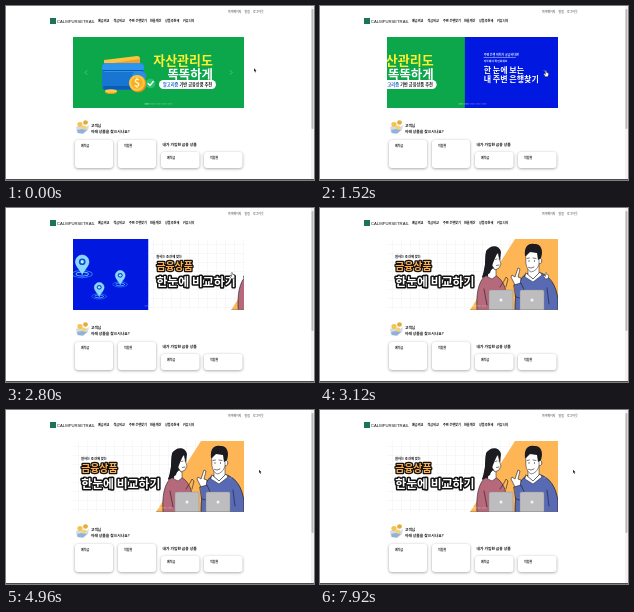
Write an HTML page with a canvas that moves like this. It is 308x174 px and loops after 8 s.

```html
<!DOCTYPE html>
<html lang="ko">
<head>
<meta charset="utf-8">
<style>
html, body { margin: 0; width: 100%; height: 100%; overflow: hidden; background: #fff; }
canvas { display: block; width: 308px; height: 174px; }
</style>
</head>
<body>
<canvas id="stage"></canvas>
<script>
const W = 308, H = 174, LOOP = 8000;
const FONT = '"Noto Sans CJK KR", "Noto Sans CJK", "Noto Sans", sans-serif';
const BANNER = { x: 67, y: 31, w: 171, h: 71 };
const SLIDE_MS = 600, CLICKS = [1205, 2480];
const INK = '#1b1b20';
const canvas = document.getElementById('stage');
const c = canvas.getContext('2d');
const dpr = window.devicePixelRatio || 1;
canvas.width = W * dpr;
canvas.height = H * dpr;

function paint(fill, stroke, width = 1) {
  if (fill) { c.fillStyle = fill; c.fill(); }
  if (stroke) { c.strokeStyle = stroke; c.lineWidth = width; c.stroke(); }
}
function rect(x, y, w, h, fill) { c.fillStyle = fill; c.fillRect(x, y, w, h); }
function box(x, y, w, h, r, fill, stroke, width) {
  c.beginPath(); c.roundRect(x, y, w, h, r); paint(fill, stroke, width);
}
function oval(x, y, rx, ry, fill, stroke, width) {
  c.beginPath(); c.ellipse(x, y, rx, ry, 0, 0, Math.PI * 2); paint(fill, stroke, width);
}
function shape(d, fill, stroke, width) {
  const p = new Path2D(d);
  if (fill) { c.fillStyle = fill; c.fill(p); }
  if (stroke) { c.strokeStyle = stroke; c.lineWidth = width || 1; c.stroke(p); }
}
function text(s, x, y, size, fill, { weight = 700, align = 'left', outline = 0 } = {}) {
  c.font = `${weight} ${size}px ${FONT}`;
  c.textAlign = align;
  if (outline) {
    c.strokeStyle = '#111';
    c.lineWidth = outline;
    c.strokeText(s, x, y);
  }
  c.fillStyle = fill;
  c.fillText(s, x, y);
}

// Cubic Bezier (.42, 0, .58, 1), the CSS "ease-in-out" curve
function easeInOut(p) {
  if (p <= 0) return 0;
  if (p >= 1) return 1;
  const at = (u, a, b) => 3 * a * u * (1 - u) ** 2 + 3 * b * u * u * (1 - u) + u ** 3;
  let lo = 0, hi = 1;
  for (let i = 0; i < 24; i++) {
    const mid = (lo + hi) / 2;
    if (at(mid, .42, .58) < p) lo = mid; else hi = mid;
  }
  return at(lo, 0, 1);
}
const step = (t, start, length) => easeInOut((t - start) / length);

function walletSlide() {
  rect(0, 0, 172, 71, '#0ca64b');
  shape('M31 23L64 19Q67 19 67 22V30H31Z', '#ffc43b');
  shape('M33 27L67 22V32H33Z', '#f1a12a');
  box(29, 26, 42, 27, 4, '#1676d2');
  box(29, 26, 42, 9, 4, '#2c95ec');
  rect(30, 33, 40, 1, '#0d57ab');
  box(30, 49, 40, 3.5, 2, '#0c5cb5');
  box(59, 35, 14, 9, 4, '#2b8ee5');
  oval(65, 47, 8.5, 8.5, '#dc901b');
  oval(64, 46, 8, 8, '#ffc73e');
  oval(64, 46, 5.8, 5.8, '#f7ae26');
  text('$', 64, 50, 11, '#fff3b9', { align: 'center' });
  oval(77.5, 46.5, 4.8, 4.8, '#27c36b');
  shape('M75 46.5L77 48.5L80.2 44.5', null, '#fff', 1.3);
  oval(38, 55, 6, 2, '#e79b20');
  oval(38, 54, 6, 1.8, '#ffcd4b');
  text('자산관리도', 140, 28.3, 13, '#fff22e', { weight: 900, align: 'right' });
  text('똑똑하게', 140, 41.7, 12.4, '#fff', { weight: 900, align: 'right' });
  box(86, 43, 57, 9, 4.5, '#fff');
  text('알고리즘', 90, 49.3, 4.2, '#1465c8');
  text('기반 금융상품 추천', 106.5, 49.3, 4.2, '#171717');
}

function pin(x, y, s) {
  c.save();
  c.translate(x, y);
  c.scale(s, s);
  oval(0, 9, 9, 3.2, null, '#2b75f4', .9);
  oval(0, 9, 5.5, 1.8, null, '#69c1ff', .9);
  shape('M0 9C-2 5-6 2-6-2A6 6 0 1 1 6-2C6 2 2 5 0 9Z', '#87d8fa', '#b5efff', .5);
  oval(0, -2, 3, 3, '#164bd8');
  oval(0, -2, 1.5, 1.5, '#b9edff');
  c.restore();
}

function bankSlide() {
  rect(0, 0, 172, 71, '#0018df');
  text('주변 은행 위치가 궁금하다면', 19, 18.8, 3, '#dfe7ff');
  rect(19, 20.5, 32, .5, '#dfe7ff');
  text('지도에서 확인하세요', 19, 24.6, 2.8, '#dfe7ff');
  text('한 눈에 보는', 19, 35.5, 8, '#fff', { weight: 900 });
  text('내 주변 은행찾기', 19, 44.8, 8, '#fff', { weight: 900 });
  pin(105, 25, 1.12);
  pin(143, 38, .82);
  pin(122, 50, .82);
}

function laptop(x) {
  box(x, 51, 24, 22, 1.5, '#bdbdc0', '#8b8b90', .4);
  oval(x + 12, 61, 1.5, 1.5, '#f4f4f6');
}

function woman() {
  shape('M95 38C100 31 97 20 99 13C102 6 112 5 114 13L113 22L109 31L107 39Z', INK);
  shape('M90 71C89 56 91 43 98 37L108 36C115 40 118 47 119 53V71Z', '#b5697a', INK, .6);
  shape('M101 34L106 29L109 31V37L105 40L101 38Z', '#fff', INK, .5);
  shape('M105 16L111 14L113 22L114 25L112 29L108 31L104 25Z', '#fff', INK, .5);
  shape('M99 12Q106 5 112 11L109 17L106 24L103 34L95 39Q99 25 99 12Z', INK);
  shape('M108.5 20.5L110 20M112 20L113 19.8M109.5 26.5L112 26', null, INK, .6);
  shape('M97 50L100 66M113 48L117 42L119 38L121 40L119 48', null, INK, .6);
}

function man() {
  shape('M128 71C128 53 131 40 139 35L151 33C163 36 169 46 171 60V71Z', '#596ab5', INK, .7);
  shape('M141 28V36L146 40L152 34V25Z', '#fff', INK, .5);
  shape('M139 34L146 40L153 33L155 36L146 43L138 38Z', '#fff', INK, .5);
  oval(153, 22, 1.8, 2.7, '#fff', INK, .5);
  shape('M139 14Q147 10 152 15V25Q150 32 144 33Q140 31 139 25Z', '#fff', INK, .5);
  shape('M138 17C137 8 141 4 147 5C153 4 157 10 154 19L151 21L150 14L143 13L139 17Z', INK);
  shape('M140 19.5L142.5 19M146 19L149 19.5M141.5 28.5Q144 30 147 28', null, INK, .6);
  oval(142, 22, .5, .7, INK);
  oval(147.5, 22, .5, .7, INK);
  shape('M128 46L124 38L125 36L128 38L131 29L133 30L131 38L134 39L133 46Z', '#fff', INK, .6);
  shape('M127 46L134 44L138 53L136 60L129 58Z', '#596ab5', INK, .6);
  shape('M160 49L162 65', null, INK, .6);
}

function compareSlide() {
  rect(0, 0, 172, 71, '#fff');
  for (let x = 5; x < 125; x += 9) rect(x, 0, .4, 71, '#ececee');
  for (let y = 5; y < 71; y += 9) rect(0, y, 125, .4, '#ececee');
  shape('M128 0H172V71H83Z', '#fdb556');
  woman();
  man();
  laptop(102);
  laptop(133);
  rect(83, 70.6, 89, .4, '#77716a');
  text('원하는 조건에 맞는', 8, 19.2, 3.3, '#111', { weight: 900 });
  text('금융상품', 8.2, 31.2, 9.9, '#ffae49', { weight: 900, outline: 2.5 });
  text('한눈에 비교하기', 8.2, 46.5, 11.9, '#fff', { weight: 900, outline: 3 });
}

function controls(shift, hover) {
  const white = a => `rgba(255,255,255,${a})`;
  shape('M81 64.6L79.1 66.5L81 68.4', null, white(.5), .6);
  shape('M224.2 64.6L226.1 66.5L224.2 68.4', null, white(.5 + .4 * hover), .6);
  for (let i = 0; i < 5; i++) {
    const active = Math.max(0, 1 - Math.abs(i - shift));
    rect(138.5 + i * 5.8, 97.7, 4.8, .5, white(.5 + .5 * active));
  }
}

function carousel(t) {
  const { x, y, w, h } = BANNER;
  const shift = CLICKS.reduce((sum, start) => sum + step(t, start, SLIDE_MS), 0);
  c.save();
  c.beginPath();
  c.rect(x, y, w, h);
  c.clip();
  [walletSlide, bankSlide, compareSlide].forEach((draw, i) => {
    const pos = i - shift;
    if (Math.abs(pos) >= 1) return;
    c.save();
    c.translate(x + pos * w, y);
    c.beginPath();
    c.rect(0, 0, w + .5, h);
    c.clip();
    draw();
    c.restore();
  });
  controls(shift, step(t, 850, 150) - step(t, 4000, 150));
  c.restore();
}

function card(x, y, w, h, label) {
  c.save();
  c.shadowColor = 'rgba(0,0,0,.38)';
  c.shadowBlur = 3 * dpr;
  c.shadowOffsetY = .8 * dpr;
  box(x, y, w, h, 3, '#fff');
  c.restore();
  text(label, x + 6, y + 7, 3, '#222');
}

function header() {
  [['마이페이지', 222], ['알림', 238.5], ['로그아웃', 247]]
    .forEach(([label, x]) => text(label, x, 7.4, 2.9, '#333', { weight: 500 }));
  rect(44, 12, 6, 6, '#1c7358');
  c.font = '400 4.2px "Liberation Sans", Arial, sans-serif';
  c.textAlign = 'left';
  c.fillStyle = '#151515';
  c.fillText('CALMPURSETRAIL', 51, 16.7);
  const menu = [['예금비교', 92], ['적금비교', 107.5], ['주변 은행찾기', 123], ['환율계산', 144], ['상품추천해', 159], ['커뮤니티', 177]];
  menu.forEach(([label, x]) => text(label, x, 16.3, 3.1, '#111'));
}

function coinIcon() {
  shape('M70 121L75 119L80 121L83 119L82 124L77 128L71 127Z', '#d5dbe4');
  shape('M71 124L76 123L81 124L77 127.5L72 127Z', '#8fb2d8');
  oval(74, 118.5, 2.6, 2.4, '#f3c44f');
  oval(79.5, 116.5, 2.4, 2.2, '#e5ad38');
  oval(78, 121.5, 2.4, 1.9, '#f6d275');
}

function page() {
  rect(0, 0, W, H, '#fff');
  header();
  coinIcon();
  text('고객님', 85, 120.6, 3.7, '#111');
  text('아래 상품을 찾으시나요?', 85, 126.7, 3.8, '#111');
  card(69, 134, 38, 28, '예적금');
  card(112, 134, 38, 28, '적립형');
  text('내가 가입한 금융 상품', 156.6, 140.4, 3.8, '#111');
  card(155, 146, 38.5, 16, '예적금');
  card(198, 146, 38.5, 16, '적립형');
  rect(305, 0, 3, 173, '#f1f1f1');
  box(305.5, 3, 2, 120, 1, '#b9b9b9');
  rect(0, 173, W, 1, '#4b4b4b');
}

function cursor(t) {
  const go = step(t, 350, 650), back = step(t, 3950, 700);
  const x = 248 - 22 * go + 27 * back;
  const y = 63.5 + 3 * go - 5.5 * back;
  c.save();
  c.translate(x, y);
  c.scale(.85, .85);
  if (x < 229) {
    shape('M-.8-2Q0-3 .7-2V0L3 .7V3L2 5H-1L-2.5 2L-2 1L-.8 2Z', '#fff', '#111', .5);
  } else {
    shape('M0-1.5V2.5L1 1.7L1.8 3.5L2.5 3.2L1.8 1.5H3Z', '#111', '#fff', .2);
  }
  c.restore();
}

function frame(now) {
  const t = now % LOOP;
  c.setTransform(dpr, 0, 0, dpr, 0, 0);
  c.lineJoin = 'round';
  c.lineCap = 'round';
  page();
  carousel(t);
  cursor(t);
  requestAnimationFrame(frame);
}
requestAnimationFrame(frame);
</script>
</body>
</html>
```
